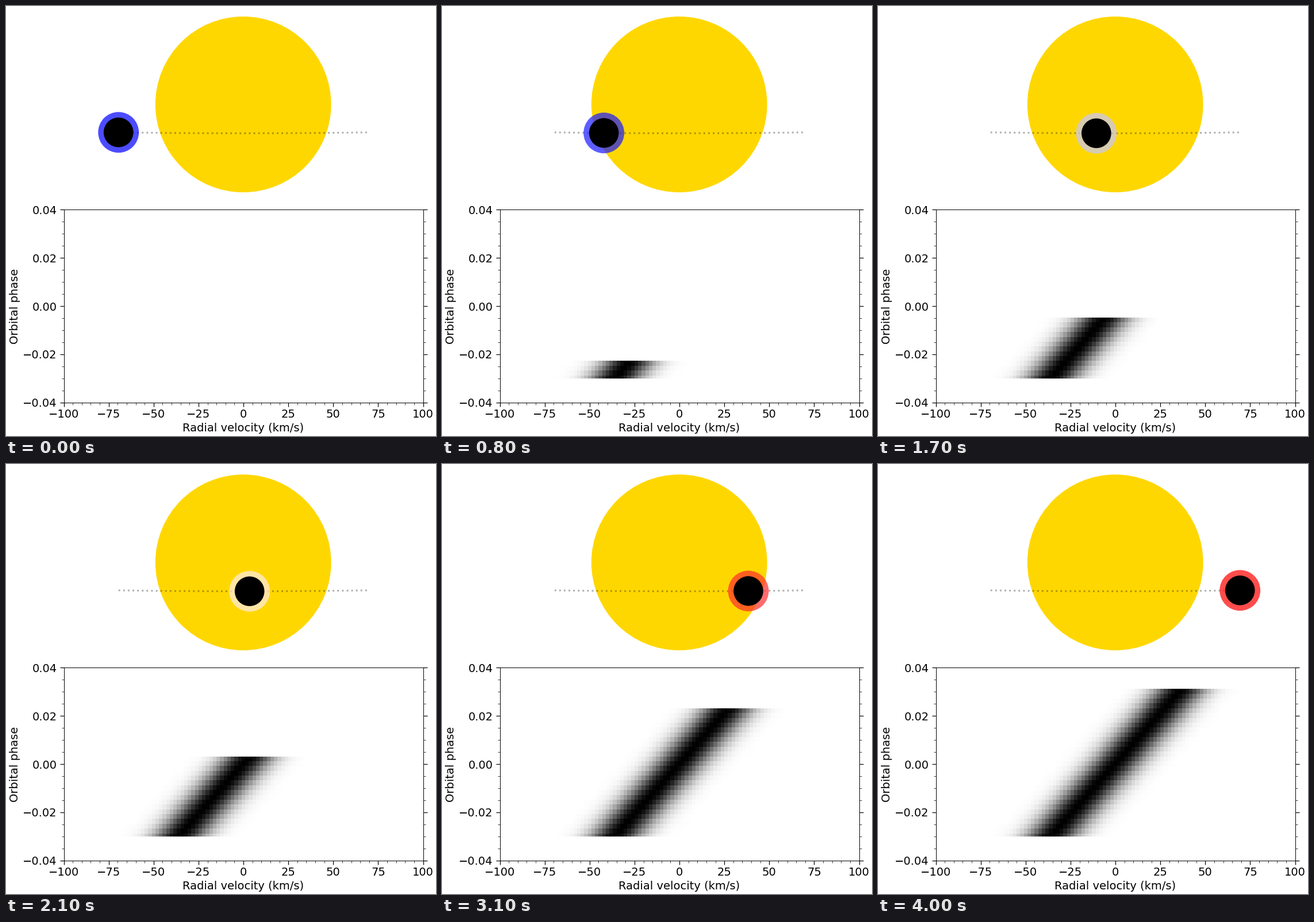
A matplotlib script for the animation above (4100 ms loop, 748 px wide and 748 px high).

```python
import numpy as np
import matplotlib.pyplot as plt
from matplotlib.animation import FuncAnimation
from matplotlib.colors import Normalize
from matplotlib.patches import Circle
from matplotlib.ticker import AutoMinorLocator, MultipleLocator

SIZE = 748
STEPS = 41
PHASE = np.linspace(-0.04, 0.04, STEPS)

# Orbit geometry in stage pixels
STAR_X, STAR_Y, STAR_R = 412.7, 171.2, 152.9
PLANET_R, HALO_R = 25.8, 35.4
ORBIT, DROP = 872.6, 50.2

# Planet trace
SPEED = 190
WIDTH = 10
FIRST, LAST = 5, 35

plt.rcParams.update({"font.family": "DejaVu Sans", "font.size": 16})
fig = plt.figure(figsize=(8.5, 8.5), dpi=88, facecolor="white")


def orbit(phase):
    angle = 2 * np.pi * phase
    return STAR_X + ORBIT * np.sin(angle), STAR_Y + DROP * np.cos(angle)


def velocity(phase):
    return SPEED * np.sin(2 * np.pi * phase)


# Sky view
sky = fig.add_axes([0, 0, 1, 1])
sky.set(xlim=(0, SIZE), ylim=(SIZE, 0))
sky.axis("off")


def disc(radius, color, zorder, **kw):
    circle = Circle((STAR_X, STAR_Y), radius, fc=color, lw=0, zorder=zorder, **kw)
    return sky.add_patch(circle)


disc(STAR_R, "gold", 1)
sky.plot(*orbit(np.linspace(-0.04, 0.04, 200)), ":", color="black",
         alpha=0.3, lw=2.5, zorder=2)
halo = disc(HALO_R, "blue", 3, alpha=0.7)
planet = disc(PLANET_R, "black", 4)
tint = Normalize(-32, 32, clip=True)

# Velocity map
ax = fig.add_axes([100.5 / SIZE, 58.5 / SIZE, 625 / SIZE, 335 / SIZE])
ax.patch.set_visible(False)
speeds = np.arange(-100, 101, 2)
rows = PHASE[FIRST:LAST + 1]
trace = np.exp(-0.5 * ((speeds - velocity(rows)[:, None]) / WIDTH) ** 2)
x_edges = np.arange(-101, 102, 2)
y_edges = np.append(-0.0302, rows + 0.0012)
mesh = ax.pcolormesh(x_edges, y_edges, np.zeros_like(trace),
                     cmap="binary", vmin=0, vmax=1)

ax.set(xlim=(-100, 100), ylim=(-0.04, 0.04),
       xlabel="Radial velocity (km/s)", ylabel="Orbital phase")
ax.xaxis.set_major_locator(MultipleLocator(25))
ax.yaxis.set_major_locator(MultipleLocator(0.02))
ax.xaxis.set_minor_locator(AutoMinorLocator(5))
ax.yaxis.set_minor_locator(AutoMinorLocator(4))
ax.tick_params(which="major", length=6, width=1)
ax.tick_params(which="minor", length=3, width=0.6)
ax.tick_params(axis="y", which="both", right=True)


def update(i):
    center = orbit(PHASE[i])
    halo.center = planet.center = center
    halo.set_facecolor(plt.cm.bwr(tint(velocity(PHASE[i]))))
    shown = np.arange(FIRST, LAST + 1) <= i
    mesh.set_array(trace * shown[:, None])
    return halo, planet, mesh


anim = FuncAnimation(fig, update, frames=STEPS, interval=100,
                     repeat=True, repeat_delay=0)
plt.show()
```
